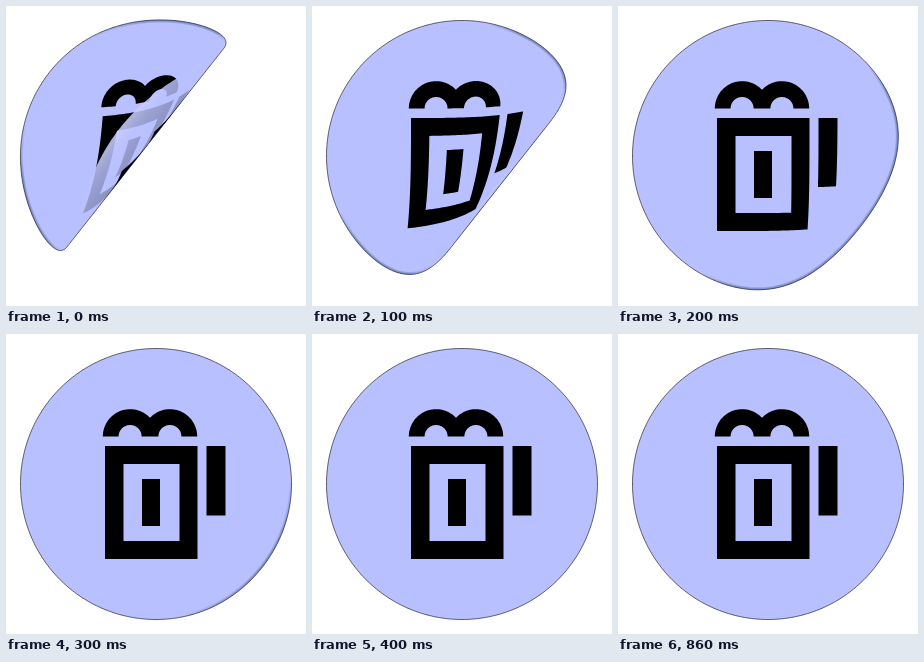
Write an HTML page with a canvas that moves like this. It is 300 by 300 pixels and loops after 1100 ms.

```html
<!DOCTYPE html>
<html lang="en">
<head>
<meta charset="utf-8">
<title>Peeling sticker</title>
<style>
  html, body { margin: 0; width: 100%; height: 100%; overflow: hidden; background: #fff; }
  canvas { display: block; width: 300px; height: 300px; }
</style>
</head>
<body>
<canvas id="stage" width="300" height="300"></canvas>
<script>
const ctx = document.getElementById('stage').getContext('2d');
const LOOP = 1100, STEP = 100;
const CENTER = 150, RADIUS = 135.5;
const LILAC = '#b8c0ff', INK = '#000';

// The sheet rolls over a cylinder whose axis is square to the peel direction.
const ROLL = 110, HALF = ROLL * Math.PI / 2;
const ANGLE = 38.3 * Math.PI / 180;
const NX = Math.cos(ANGLE), NY = Math.sin(ANGLE);

// Where the sheet leaves the ground, measured from the centre, at each step.
const LIFTS = [-123.5, -62, 22, 102, 140, 140];

function arc(cx, cy, r, from, to, n = 40) {
  return Array.from({ length: n + 1 }, (_, i) => {
    const a = from + (to - from) * i / n;
    return [cx + r * Math.cos(a), cy + r * Math.sin(a)];
  });
}

// Adds points along straight sides so that they can bend.
function refine(points) {
  return points.flatMap(([x, y], i) => {
    const [u, v] = points[(i + 1) % points.length];
    const n = Math.max(1, Math.ceil(Math.hypot(u - x, v - y) / 3));
    return Array.from({ length: n }, (_, k) => [x + (u - x) * k / n, y + (v - y) * k / n]);
  });
}

const box = (l, t, r, b) => refine([[l, t], [r, t], [r, b], [l, b]]);

function makeFoam() {
  const y = 102.5, left = 124.1, right = 163.9, outer = 27.3, inner = 11.5;
  const meet = Math.acos((right - left) / 2 / outer);
  return refine([
    ...arc(left, y, outer, Math.PI, 2 * Math.PI - meet),
    ...arc(right, y, outer, Math.PI + meet, 2 * Math.PI),
    ...arc(right, y, inner, 2 * Math.PI, Math.PI),
    ...arc(left, y, inner, 2 * Math.PI, Math.PI)
  ]);
}

const disc = [arc(CENTER, CENTER, RADIUS, 0, 2 * Math.PI, 360)];
const mug = [
  makeFoam(),
  box(99, 112, 191.5, 225),
  box(117.5, 130, 173.5, 207),
  box(136, 145, 154, 192),
  box(200.5, 112, 219.5, 181.5)
];

// Maps one side of the sheet; points on the other side collapse onto the fold.
function bend([x, y], lift, back) {
  const dx = x - CENTER, dy = y - CENTER;
  const along = dx * NY - dy * NX;
  const fold = lift + HALF;
  let d = dx * NX + dy * NY;
  d = back ? Math.max(d, fold) : Math.min(d, fold);
  if (d > lift) d = lift + ROLL * Math.sin((d - lift) / ROLL);
  return [CENTER + d * NX + along * NY, CENTER + d * NY - along * NX];
}

function trace(shape, lift, back) {
  const path = new Path2D();
  for (const ring of shape) {
    ring.forEach((p, i) => {
      const [x, y] = bend(p, lift, back);
      i ? path.lineTo(x, y) : path.moveTo(x, y);
    });
    path.closePath();
  }
  return path;
}

function line(path, color, width) {
  ctx.strokeStyle = color;
  ctx.lineWidth = width;
  ctx.stroke(path);
}

// A gradient along the peel direction, between two distances from the centre.
function ramp(from, to, stops) {
  const at = d => [CENTER + d * NX, CENTER + d * NY];
  const g = ctx.createLinearGradient(...at(from), ...at(to));
  for (const [offset, color] of stops) g.addColorStop(offset, color);
  return g;
}

function drawFlap(lift) {
  const tip = lift + ROLL * Math.sin((RADIUS - lift) / ROLL);
  ctx.fillStyle = ramp(tip, lift + ROLL, [
    [0, 'rgba(202,207,252,.88)'],
    [0.4, 'rgba(187,194,254,.83)'],
    [1, 'rgba(184,192,255,.76)']
  ]);
  ctx.fill(trace(disc, lift, true));
  ctx.fillStyle = INK;
  ctx.fill(trace(mug, lift, true), 'evenodd');
}

// Darkens the rim where the sheet is off the ground.
function drawBevel(sheet, lift) {
  const shade = ramp(lift, lift + ROLL, [
    [0, 'rgba(70,95,145,0)'],
    [0.3, 'rgba(70,95,145,.3)'],
    [0.85, 'rgba(70,95,145,.3)'],
    [0.97, 'rgba(70,95,145,0)']
  ]);
  ctx.save();
  ctx.clip(sheet);
  line(sheet, shade, 5);
  line(sheet, shade, 3);
  ctx.restore();
}

function draw(lift) {
  ctx.fillStyle = '#fff';
  ctx.fillRect(0, 0, 300, 300);
  const sheet = trace(disc, lift, false);
  ctx.fillStyle = LILAC;
  ctx.fill(sheet);
  ctx.fillStyle = INK;
  ctx.fill(trace(mug, lift, false), 'evenodd');
  if (lift + HALF < RADIUS) drawFlap(lift);
  if (lift < RADIUS) drawBevel(sheet, lift);
  line(sheet, 'rgba(15,16,30,.7)', 0.9);
}

function tick() {
  const t = performance.now() % LOOP;
  draw(LIFTS[Math.min(LIFTS.length - 1, Math.floor(t / STEP))]);
  requestAnimationFrame(tick);
}
tick();
</script>
</body>
</html>
```
